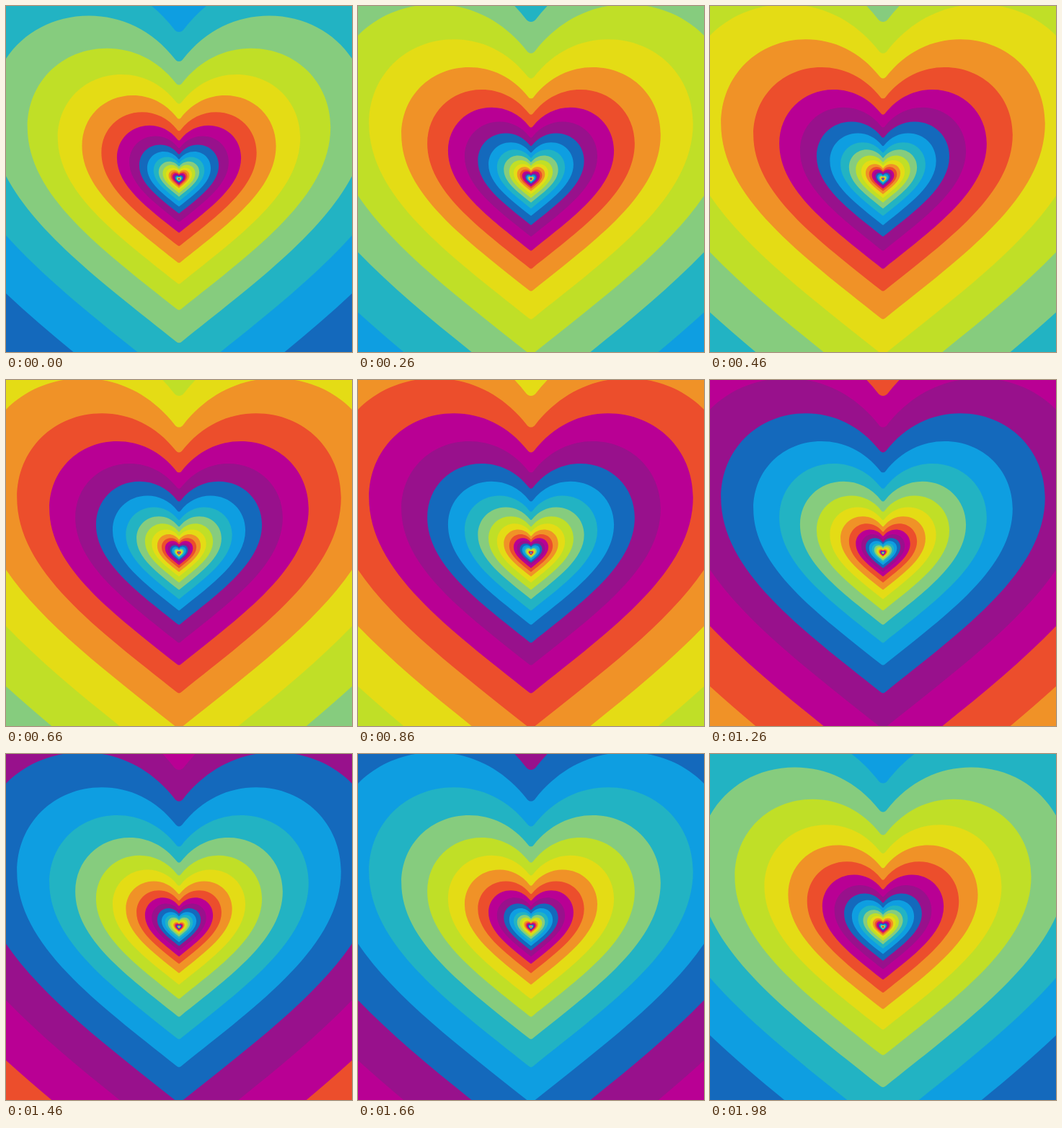
Recreate the animation shown at these times as an HTML page with a canvas. Size 480 by 480 pixels, loop 2 s.

```html
<!DOCTYPE html>
<html lang="en">
<head>
<meta charset="utf-8">
<title>Rainbow heart tunnel</title>
<style>
  html, body { margin: 0; width: 100%; height: 100%; overflow: hidden; }
  canvas { display: block; }
</style>
</head>
<body>
<canvas id="stage" width="480" height="480"></canvas>
<script>
const ctx = document.getElementById('stage').getContext('2d');

const LOOP = 2000;
const STEP = 200;      // time for one ring to grow to the size of the next
const RATIO = 1.25;    // size ratio between neighbouring rings
const BASE = 210 / 225; // scale of ring 0 at time 0

// From ring 0 inwards
const colors = ['#c0df27', '#e4dc15', '#f09227', '#ec4e2c', '#b90094',
                '#98118c', '#1469bc', '#0e9ee1', '#22b3c3', '#86cc7e'];

// Left half of the heart, 225 units wide, around the zoom centre
const half = new Path2D(`M0 -139.7
  C-1.8 -139.7 -3.2 -140.6 -4.2 -141.8
  C-32 -177.5 -69 -194 -107 -194
  C-174 -194 -225 -143.5 -225 -77
  C-225 25 -113.5 105 -3.5 193
  Q-1.6 194.6 0 194.6 Z`);
const heart = new Path2D(half);
heart.addPath(half, new DOMMatrix([-1, 0, 0, 1, 0, 0]));

function draw(time) {
  const phase = (time % LOOP) / STEP;
  const first = Math.floor(phase) - 6;
  for (let n = first; n < first + 33; n++) {
    const scale = BASE * RATIO ** (phase - n);
    ctx.setTransform(scale, 0, 0, scale, 240, 240);
    ctx.fillStyle = colors[(n + 10) % 10];
    ctx.fill(heart);
  }
}

const start = performance.now();
function tick() {
  draw(performance.now() - start);
  requestAnimationFrame(tick);
}
tick();
</script>
</body>
</html>
```
